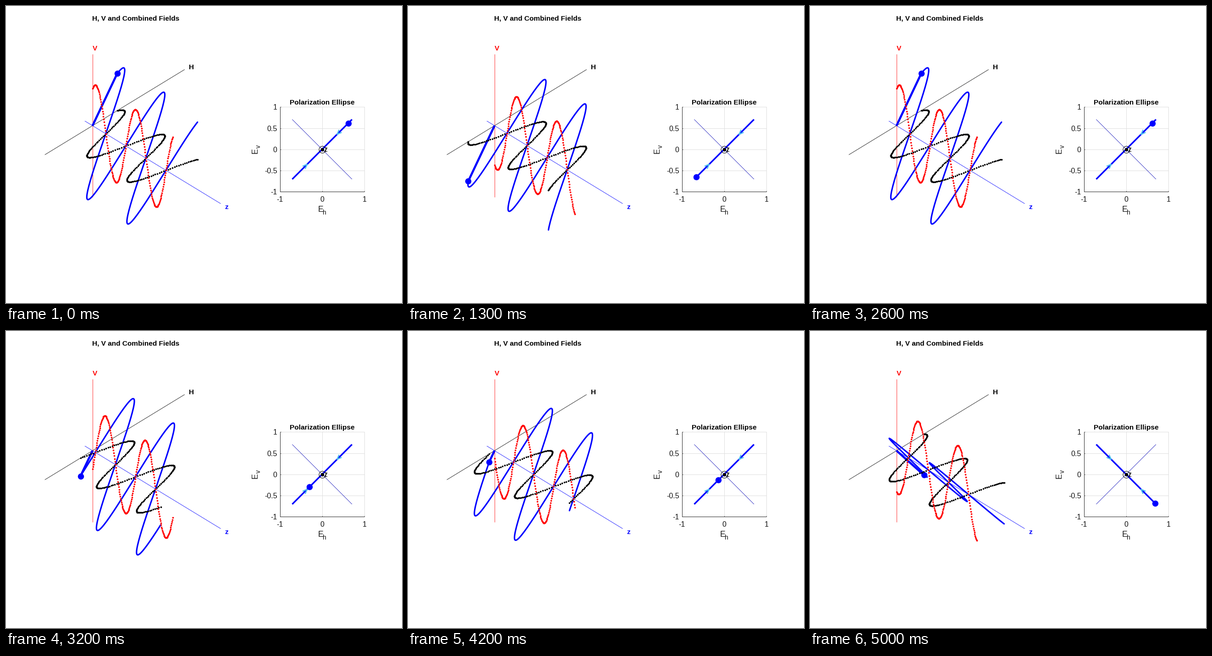
A matplotlib script that plays this animation: 864x648 px, repeating every 5100 ms.

```python
import numpy as np
import matplotlib.pyplot as plt
from matplotlib.animation import FuncAnimation

W, H = 864, 648
FRAMES, INTERVAL = 51, 100
STEPS_PER_CYCLE = 25
STEPS_PER_MODE = 50
AMP = np.sqrt(0.5)

# Screen vectors of the oblique 3D axes, in pixels per unit
ORIGIN = np.array([188.8, 261.1])
H_VEC = np.array([87.2, -53.2])
V_VEC = np.array([0.0, -131.0])
Z_VEC = np.array([87.5, 53.2])

# Ellipse plot
CENTER = np.array([689.7, 312.7])
UNIT = 92.2

BLUE, RED, BLACK = "#0000ff", "#ff0000", "#000000"
CYAN, DARK, GRID = "#4dbeee", "#262626", "#dedede"
INK = "#141414"

plt.rcParams["font.family"] = "Liberation Sans"
# At 72 dpi one point is one pixel
fig = plt.figure(figsize=(W / 72, H / 72), dpi=72, facecolor="white")
ax = fig.add_axes([0, 0, 1, 1])
ax.set_xlim(0, W)
ax.set_ylim(H, 0)
ax.axis("off")


def line(p, q, color, width, z=1):
    return ax.plot([p[0], q[0]], [p[1], q[1]], color=color, lw=width,
                   zorder=z, solid_capstyle="butt", snap=False)[0]


def rule(p, q, color, width, z=1):
    """Horizontal or vertical line on whole pixels."""
    p, q = (np.round(e) + 0.5 for e in (p, q))
    return line(p, q, color, width, z)


def label(x, y, text, size, color=BLACK, ha="center", **kw):
    return ax.text(x, y, text, fontsize=size, color=color, ha=ha,
                   va="baseline", **kw)


def dots(color, size, z):
    return ax.plot([], [], "o", ms=size, color=color, mew=0, zorder=z)[0]


def space(h, v, z):
    """Project field values to the screen; one row per point."""
    h, v, z = (np.atleast_1d(a)[:, None] for a in (h, v, z))
    return ORIGIN + h * H_VEC + v * V_VEC + z * Z_VEC


def plane(h, v):
    return CENTER + UNIT * np.array([h, -v])


def draw_space_axes():
    rule((189, 105), (189, 417), RED, 0.8)
    line((84.7, 324.6), (389.7, 138.6), BLACK, 0.8)
    line((172, 250.9), (468.5, 431.3), BLUE, 0.8)
    label(283.5, 31.7, "H, V and Combined Fields", 15.4, weight="bold")
    label(194, 96.7, "V", 15.4, RED, weight="bold")
    label(404.5, 138.5, "H", 15.4, weight="bold")
    label(481, 443.3, "z", 15.4, BLUE, weight="bold")


def draw_plane_axes():
    left, bottom = plane(-1, -1)
    right, top = plane(1, 1)
    for v in (-1, -0.5, 0, 0.5, 1):
        y = plane(0, v)[1]
        rule((left, y), (right, y), GRID, 1)
        rule((left, y), (left + 2, y), DARK, 0.8, 2)
        label(591.5, y + 6, f"{v:g}", 16, INK, "right")
    for h in (-1, 0, 1):
        x = plane(h, 0)[0]
        rule((x, top), (x, bottom), GRID, 1)
        rule((x, bottom), (x, bottom - 2), DARK, 0.8, 2)
        label(x, 427, f"{h:g}", 16, INK)
    rule((left, top), (left, bottom), DARK, 1, 2)
    rule((left, bottom), (right, bottom), DARK, 1, 2)

    label(689.7, 214.5, "Polarization Ellipse", 15.4, weight="bold")
    label(680, 448.7, "E", 17.6, INK, "left")
    label(691.5, 455.2, "h", 14, INK, "left")
    up = dict(rotation=90, rotation_mode="anchor")
    label(549, 322.5, "E", 17.6, INK, "left", **up)
    label(555, 310.5, "v", 14, INK, "left", **up)

    # Propagation axis pointing at the viewer
    ax.plot(*CENTER, "o", ms=15, mfc="none", mec=BLACK, mew=1, zorder=6)
    ax.plot(*CENTER, "o", ms=7.5, color=BLACK, mew=0, zorder=6)
    label(693.5, 318, "z", 16, ha="left", zorder=6)


draw_space_axes()
draw_plane_axes()

zs = np.linspace(0, 2, 201)
vector = line(ORIGIN, ORIGIN, BLUE, 4.6, 2)
tip = dots(BLUE, 13.4, 3)
combined = ax.plot([], [], color=BLUE, lw=3.2, zorder=4,
                   solid_capstyle="round", solid_joinstyle="round")[0]
h_dots = dots(BLACK, 3.7, 5)
v_dots = dots(RED, 3.7, 5)

thin = line(CENTER, CENTER, "#0000b4", 0.75, 3)
thick = line(CENTER, CENTER, BLUE, 3.4, 4)
arrows = [line(CENTER, CENTER, CYAN, 2.4, 5) for _ in range(2)]
spot = dots(BLUE, 13.4, 7)


def set_points(artist, pts):
    artist.set_data(*np.transpose(pts))


def draw_ellipse(sign):
    ends = AMP, sign * AMP
    set_points(thick, [plane(-ends[0], -ends[1]), plane(*ends)])
    set_points(thin, [plane(-ends[0], ends[1]), plane(ends[0], -ends[1])])
    # Open arrowheads halfway out, pointing to the centre
    for arrow, side in zip(arrows, (1, -1)):
        head = plane(side * ends[0] / 2, side * ends[1] / 2)
        out = side * np.array([1, -sign])
        barbs = [head + out * b for b in ((10, 4.4), (4.4, 10))]
        set_points(arrow, [barbs[0], head, barbs[1]])


def update(i):
    # The second pose is held for two frames
    step = i + 1 + (i < 2)
    sign = 1 if step <= STEPS_PER_MODE else -1
    phase = 2 * np.pi * step / STEPS_PER_CYCLE
    eh = AMP * np.cos(2 * np.pi * zs - phase)
    ev = sign * eh
    none = np.zeros_like(zs)

    curve = space(eh, ev, zs)
    set_points(combined, curve)
    set_points(h_dots, space(eh, none, zs))
    set_points(v_dots, space(none, ev, zs))
    set_points(vector, [ORIGIN, curve[0]])
    set_points(tip, curve[:1])

    draw_ellipse(sign)
    set_points(spot, [plane(eh[0], ev[0])])
    return vector, tip, combined, h_dots, v_dots, thin, thick, *arrows, spot


anim = FuncAnimation(fig, update, frames=FRAMES, interval=INTERVAL,
                     repeat=True, repeat_delay=0, blit=False)
plt.show()
```
